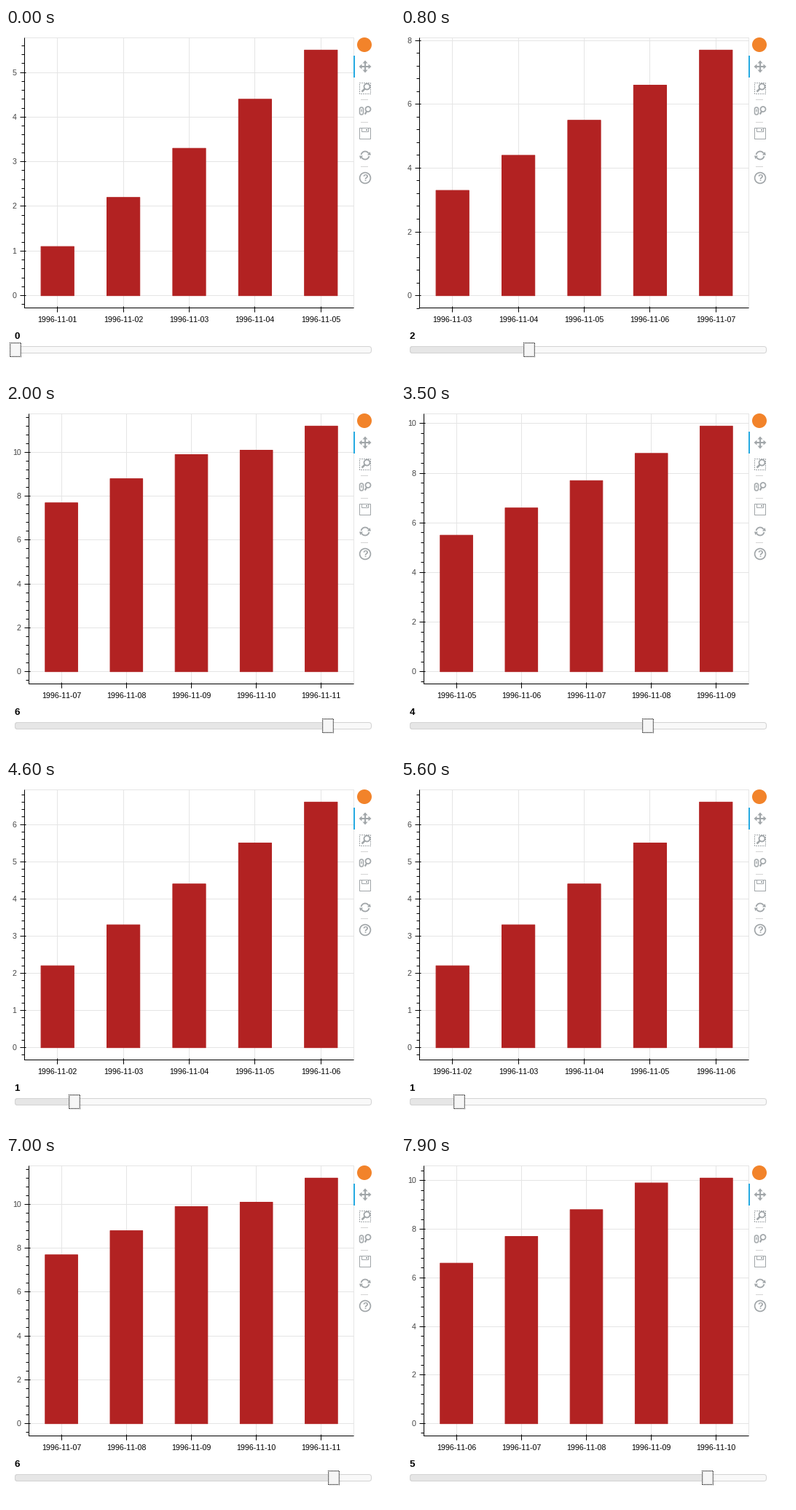
These frames come from a looping animation (534x478 px, 8 s). A matplotlib script:

```python
import math

import matplotlib.pyplot as plt
from matplotlib.animation import FuncAnimation
from matplotlib.patches import Arc, Circle, FancyBboxPatch, Polygon, Rectangle

W, H, DPI = 534, 478, 64
PX = 72 / DPI
STEP, LOOP = 100, 8000

TOP, BOTTOM, RIGHT = 13.5, 384.5, 477.5
BAR, GRID, ICON, LABEL = "#b22222", "#e5e5e5", "#a1a6a9", "#444444"
VALUES = [1.1 * d for d in range(1, 10)] + [10.1, 11.2]
WINDOW = 5

GLIDE, LAG = 400, 50  # handle travel time, delay before the chart follows
UP_1 = [105, 440, 795, 1150, 1505, 1861]
DOWN = [2665, 3080, 3490, 3850, 4220, 4592]
UP_2 = [5312 + 305 * k for k in range(6)]
MOVES = ([(t, k, k + 1) for k, t in enumerate(UP_1)]
         + [(t, 6 - k, 5 - k) for k, t in enumerate(DOWN)]
         + [(t, k, k + 1) for k, t in enumerate(UP_2)]
         + [(7510, 6, 5)])

plt.rcParams.update({
    "font.family": "Liberation Sans",
    "path.snap": False,        # coordinates already sit on pixel centres
    "text.kerning_factor": 6,  # evenly spaced digits
})
fig = plt.figure(figsize=(W / DPI, H / DPI), dpi=DPI, facecolor="white")
ax = fig.add_axes([0, 0, 1, 1])


def line(xs, ys, color, width=1, **kw):
    ax.plot(xs, ys, color=color, lw=width * PX, zorder=1,
            solid_capstyle="butt", **kw)


def patch(shape):
    shape.set_zorder(1)
    ax.add_patch(shape)


def rect(x0, y0, x1, y1, face="none", edge="none", width=1, **kw):
    patch(Rectangle((x0, y0), x1 - x0, y1 - y0, fc=face, ec=edge,
                    lw=width * PX, **kw))


def pill(x0, x1, face, edge):
    patch(FancyBboxPatch((x0, 437.5), x1 - x0, 9, fc=face, ec=edge, lw=PX,
                         boxstyle="round,pad=0,rounding_size=3.5"))


def ring(x, y, r, width, face="none"):
    patch(Circle((x, y), r, fc=face, ec=ICON, lw=width * PX))


def triangle(*points):
    patch(Polygon(points, fc=ICON, ec="none"))


def text(x, y, s, size, color, **kw):
    ax.text(x, y, s, fontsize=size * PX, color=color, va="baseline", **kw)


def state(t):
    pos = value = 0
    for start, old, new in MOVES:
        if t >= start:
            p = min((t - start) / GLIDE, 1)
            pos = old + (new - old) * (0.5 - math.cos(math.pi * p) / 2)
        if t >= start + LAG:
            value = new
    return pos, value


def draw_chart(first):
    values = VALUES[first:first + WINDOW]
    peak = values[-1]
    scale = (BOTTOM - TOP) / (1.1 * peak)
    zero = BOTTOM - 0.05 * peak * scale
    left = 31.5 if peak > 9.6 else 25.5
    slot = (RIGHT - left) / WINDOW
    major = 1 if peak < 7 else 2
    minor = major / 5

    def pixel(v):
        return math.floor(zero - v * scale) + 0.5

    centers = [left + slot * (j + 0.5) for j in range(WINDOW)]
    ticks = [math.floor(c) + 0.5 for c in centers]
    levels = range(0, int(peak * 1.05) + 1, major)

    for x in ticks:
        line([x, x], [TOP, BOTTOM], GRID)
    for v in levels:
        line([left, RIGHT], [pixel(v)] * 2, GRID)
    rect(left, TOP, RIGHT, BOTTOM, edge=GRID)

    for c, v in zip(centers, values):
        rect(c - slot / 4, zero - v * scale, c + slot / 4, zero,
             BAR, BAR, joinstyle="round")

    line([left, left], [TOP, BOTTOM + 0.5], "black")
    line([left - 0.5, RIGHT], [BOTTOM, BOTTOM], "black")
    for n in range(-1, int(peak * 1.05 / minor) + 1):
        line([left - 4, left], [pixel(n * minor)] * 2, "black")
    for v in levels:
        line([left - 6, left + 2], [pixel(v)] * 2, "black")
        text(left - 11, pixel(v) + 3.5, str(v), 10.67, LABEL, ha="right")
    for j, x in enumerate(ticks):
        line([x, x], [BOTTOM - 2, BOTTOM + 6], "black")
        text(x, 404, f"1996-11-{first + j + 1:02d}", 10.67, "black",
             ha="center")


def draw_toolbar():
    patch(Circle((492, 23), 10, fc="#f2832a", ec="none"))
    rect(477, 38, 479, 68, "#26aae1")
    for y in (98.5, 129.5, 190.5):
        line([487, 497], [y, y], "#d3d3d3")

    # pan
    x, y = 493, 53
    line([x - 6, x + 6], [y, y], ICON, 2)
    line([x, x], [y - 6, y + 6], ICON, 2)
    for s in (-1, 1):
        triangle((x + 8.5 * s, y), (x + 4.5 * s, y - 3.5), (x + 4.5 * s, y + 3.5))
        triangle((x, y + 8.5 * s), (x - 3.5, y + 4.5 * s), (x + 3.5, y + 4.5 * s))

    # box zoom
    rect(485.5, 75.5, 500.5, 90.5, edge=ICON, ls=(0.5, (2, 1)))
    line([488.5, 492.5], [87.5, 83.5], ICON, 2.6)
    ring(495.5, 80.5, 4, 1.8, "white")

    # wheel zoom
    patch(FancyBboxPatch((485.5, 109), 5, 10, fc="none", ec=ICON, lw=1.5 * PX,
                         boxstyle="round,pad=0,rounding_size=2.4"))
    line([488, 488], [111.5, 115], ICON, 1.3)
    line([492.8, 495], [118.5, 114.5], ICON, 2.2)
    ring(497, 111.5, 3.5, 1.7, "white")

    # save
    rect(485.5, 137.5, 500.5, 152.5, edge=ICON)
    rect(488.5, 137.5, 497.5, 142.5, edge=ICON)
    rect(494, 139, 496, 141, ICON)

    # reset
    for a, b in ((190, 330), (10, 150)):
        patch(Arc((493, 175), 11, 11, theta1=a, theta2=b, ec=ICON, lw=1.8 * PX))
    triangle((496, 174.5), (501, 174.5), (499.5, 170))
    triangle((485, 175.5), (490, 175.5), (486.5, 180))

    # help
    ring(493, 206, 7.4, 1.7)
    text(493, 210.5, "?", 12.5, ICON, ha="center", weight="bold")


def draw_slider(pos, value):
    x = round(13 + 81.5 * pos - 0.01)
    text(11.5, 427, str(value), 13.33, "black", weight="bold")
    pill(12.5, 501.5, "#f9f9f9", "#d3d3d3")
    if x > 17:
        pill(12.5, x, "#e6e6e6", "#d3d3d3")
    rect(x - 8, 432, x + 8, 452, "#f6f6f6")
    rect(x - 6.5, 433.5, x + 6.5, 450.5, edge="#d8d8d8")
    rect(x - 7.5, 432.5, x + 7.5, 451.5, edge="black", ls=(0.5, (1, 1)))


def draw(i):
    ax.clear()
    ax.set(xlim=(0, W), ylim=(H, 0))
    ax.axis("off")
    pos, value = state(i * STEP)
    draw_chart(value)
    draw_toolbar()
    draw_slider(pos, value)
    return []


anim = FuncAnimation(fig, draw, frames=LOOP // STEP, interval=STEP,
                     init_func=lambda: [], repeat=True, repeat_delay=0)
plt.show()
```
